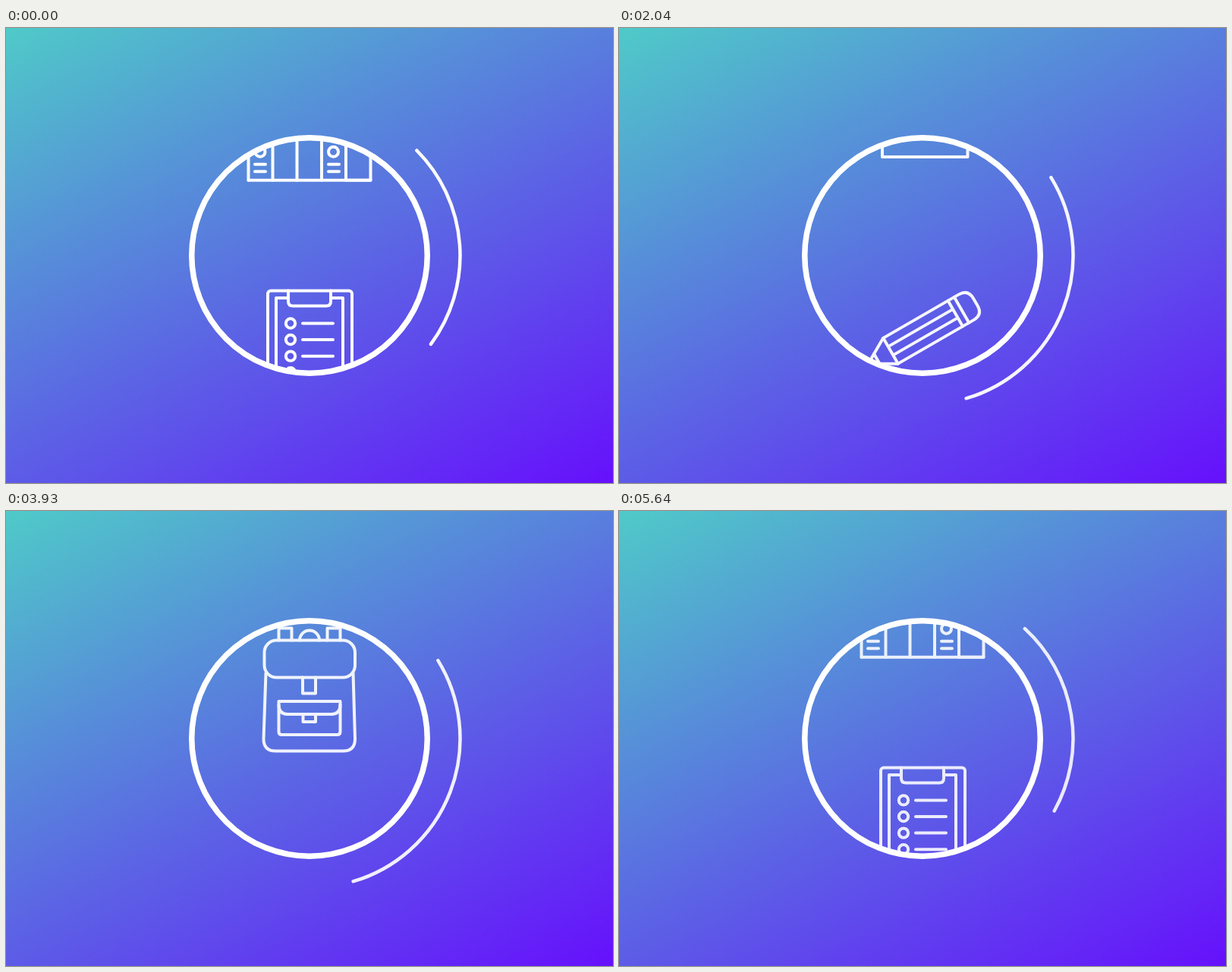
Recreate the animation shown at these times as an HTML page. Size 800 by 600 pixels, loop 5.67 s.

```html
<!DOCTYPE html>
<html lang="en">
<head>
<meta charset="utf-8">
<title>School supplies loader</title>
<style>
  html, body { margin: 0; width: 100%; height: 100%; overflow: hidden; }
  body { background: linear-gradient(153deg, #4fcac8, #6610fc); }
  svg { display: block; width: 800px; height: 600px; }
  svg * { vector-effect: none; }
</style>
</head>
<body>
<svg viewBox="0 0 800 600" fill="none" stroke="#fff" stroke-width="4" stroke-linecap="round" stroke-linejoin="round">
  <defs>
    <clipPath id="lens"><circle cx="400" cy="300" r="154"/></clipPath>
  </defs>

  <g id="moving">
    <g clip-path="url(#lens)">
      <g id="clipboard">
        <rect x="-55" y="-72" width="111" height="145" rx="4"/>
        <path d="M-28-62.5H-44V62H44V-62.5H28"/>
        <path d="M-28-72V-58Q-28-52-22-52H22Q28-52 28-58V-72"/>
        <g id="checks"></g>
      </g>

      <g id="books">
        <path d="M-80.5 80V-45.5H-48.5M-48.5 80V-64H-16.5M-16.5 80V-80.5H16V80M16-53.5H48M48 80V-64H80.5V80Z"/>
        <path d="M-80.5 80H80.5"/>
        <rect x="-5" y="-64" width="10" height="45.5"/>
        <circle cx="-65" cy="42.5" r="6.5"/>
        <circle cx="-32" cy="-44" r="6.5"/>
        <circle cx="31.5" cy="42.5" r="6.5"/>
        <path d="M-72 59h14m-14 9.5h14M25 59h14m-14 9.5h14M57-49.5h14m-14 9.5h14"/>
      </g>

      <g id="pencil">
        <g transform="translate(-42 29.5) rotate(-30)">
          <path d="M0-19.5H115Q129-19.5 129-5.5V5.5Q129 19.5 115 19.5H0L-29 3Q-34 0-29-3Z"/>
          <path d="M0-19.5V19.5M0-6.5H98.5M0 6.5H98.5M98.5-19.5V19.5M108-19.5V19.5M-21-7.5V7.5"/>
        </g>
      </g>

      <g id="document">
        <path d="M-53-80.5H31L59.5-52.5V80H-53ZM31-80.5V-52.5H59.5"/>
        <g id="lines"></g>
      </g>

      <g id="backpack">
        <rect x="-59.5" y="-65" width="119.5" height="49" rx="16"/>
        <path d="M-57.5-22L-60.5 65Q-60.5 81-44.5 81H44Q60 81 60 65L57.5-22"/>
        <path d="M-40.5-65V-81H-23.5V-65M23.5-65V-81H40.5V-65M-13-65A13 13 0 0 1 13-65"/>
        <path d="M-9-16V5H8V-16"/>
        <path d="M-40.5 15.5H40.5V55.5Q40.5 59.5 36.5 59.5H-36.5Q-40.5 59.5-40.5 55.5Z"/>
        <path d="M-40.5 20Q-40.5 32.5-29 32.5H29Q40.5 32.5 40.5 20M-8.5 32.5V42.5H8V32.5"/>
      </g>
    </g>
    <path id="arc" stroke-width="4.5"/>
  </g>

  <circle cx="400" cy="300" r="155.25" stroke-width="7.5"/>
</svg>

<script>
const LOOP = 5670, STEP = 30;
const $ = id => document.getElementById(id);

// Time each icon crosses the centre (ms) and its fall speed (px per ms)
const icons = [
  ['clipboard', 5228, 0.268],
  ['books', 669, 0.268],
  ['pencil', 1616, 0.227],
  ['document', 2812, 0.272],
  ['backpack', 4154, 0.2876]
].map(([id, mid, speed]) => ({ el: $(id), mid, speed }));

$('checks').innerHTML = [0, 1, 2, 3].map(i => {
  const y = -29 + i * 21.6;
  return `<circle cx="-25" cy="${y}" r="6.2"/><path d="M-9 ${y}H31"/>`;
}).join('');

$('lines').innerHTML = [0, 1, 2, 3, 4, 5].map(i =>
  `<path d="M-36.5 ${-38 + i * 17.1}H42.5"/>`).join('');

const ARC = { cx: 402, cy: 300, r: 196.5, period: 1890, bend: 1020, start: 1378 };
const mod = (a, n) => ((a % n) + n) % n;

function point(deg) {
  const a = deg * Math.PI / 180;
  return `${(ARC.cx + ARC.r * Math.cos(a)).toFixed(2)} ${(ARC.cy + ARC.r * Math.sin(a)).toFixed(2)}`;
}

// Two straight segments: from a to b until the bend, then b to c
function twoPart(s, a, b, c) {
  return s < ARC.bend
    ? a + (b - a) * s / ARC.bend
    : b + (c - b) * (s - ARC.bend) / (ARC.period - ARC.bend);
}

function drawArc(t) {
  const s = mod(t - ARC.start, ARC.period);
  const tail = twoPart(s, -90, 0, 270);
  const head = Math.max(tail + 0.01, twoPart(s, -90, 162, 266));
  const fade = ARC.period / 10;
  $('arc').setAttribute('d', `M${point(tail)}A${ARC.r} ${ARC.r} 0 0 1 ${point(head)}`);
  $('arc').setAttribute('opacity', Math.min(1, s / fade, (ARC.period - s) / fade));
}

function draw(t) {
  for (const { el, mid, speed } of icons) {
    const dt = mod(t - mid + LOOP / 2, LOOP) - LOOP / 2;
    el.setAttribute('transform', `translate(400 ${(300 + speed * dt).toFixed(2)})`);
  }
  drawArc(t);
  $('moving').setAttribute('opacity', 0.98 - 0.1 * t / LOOP);
}

const begin = performance.now();
function tick() {
  const t = (performance.now() - begin) % LOOP;
  draw(Math.floor(t / STEP) * STEP);
  requestAnimationFrame(tick);
}
tick();
</script>
</body>
</html>
```
